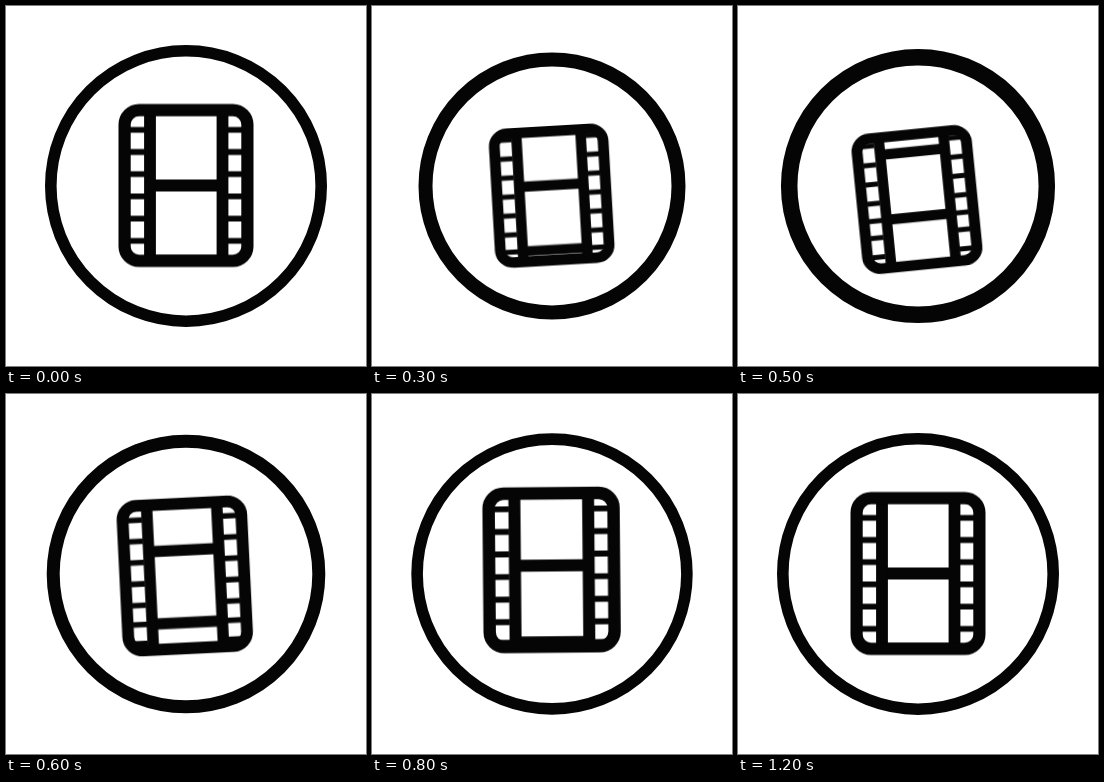
Recreate the animation shown at these times as an HTML page without scripts. Size 360 by 360 pixels, loop 1.4 s.

```html
<!DOCTYPE html>
<html lang="en">
<head>
<meta charset="utf-8">
<title>Film icon</title>
<style>
html, body { margin: 0; width: 100%; height: 100%; overflow: hidden; background: #fff; }
svg { display: block; width: 100vw; height: 100vh; }
.ring, .frame, .line, .holes { fill: none; stroke: #050505; }
.line { stroke-width: 11.8; }
.frame { stroke-width: 12.2; }
.holes { stroke-width: 16; stroke-dasharray: 5.8 16.4; }
.seam { stroke-width: 5.8; }
.ring, .film, .strip { animation: 1400ms step-end infinite; }
.ring { animation-name: ring; }
.film { animation-name: film; }
.strip { animation-name: strip; }

@keyframes ring {
  0%, 85.71%, 100% { r: 135.2px; stroke-width: 11.6px; }
  14.28% { r: 131.7px; stroke-width: 12.6px; }
  21.42% { r: 126.5px; stroke-width: 14px; }
  28.57% { r: 126.3px; stroke-width: 15.9px; }
  35.71% { r: 128.8px; stroke-width: 16.5px; }
  42.85% { r: 132.8px; stroke-width: 13px; }
  50% { r: 134.4px; stroke-width: 12px; }
  57.14% { r: 134.9px; stroke-width: 11.6px; }
  64.28% { r: 135.1px; stroke-width: 11.6px; }
}
@keyframes film {
  0%, 85.71%, 100% { transform: translate(180px, 179.5px) rotate(0deg) scale(1); }
  14.28% { transform: translate(180px, 183px) rotate(-1.1deg) scale(.965, .955); }
  21.42% { transform: translate(179.7px, 189.7px) rotate(-3.3deg) scale(.887, .856); }
  28.57% { transform: translate(179.3px, 193.5px) rotate(-5.2deg) scale(.865, .835); }
  35.71% { transform: translate(179px, 193.5px) rotate(-5.7deg) scale(.895, .866); }
  42.85% { transform: translate(178.8px, 182px) rotate(-2.8deg) scale(.968, .96); }
  50% { transform: translate(179.3px, 177.2px) rotate(-1.2deg) scale(1.005); }
  57.14% { transform: translate(179.6px, 176px) rotate(-.5deg) scale(1.017); }
  64.28% { transform: translate(179.9px, 177.3px) rotate(-.2deg) scale(1.01); }
  71.42% { transform: translate(180px, 178.5px) rotate(0deg) scale(1.004); }
  78.57% { transform: translate(180px, 179.2px) rotate(0deg) scale(1.001); }
}
@keyframes strip {
  0%, 85.71%, 100% { transform: translateY(0); }
  14.28% { transform: translateY(-3px); }
  21.42% { transform: translateY(-12.3px); }
  28.57% { transform: translateY(-38px); }
  35.71% { transform: translateY(-55.5px); }
  42.85% { transform: translateY(-27px); }
  50% { transform: translateY(-11px); }
  57.14% { transform: translateY(-4.4px); }
  64.28% { transform: translateY(-1.8px); }
  71.42% { transform: translateY(-.6px); }
  78.57% { transform: translateY(-.2px); }
}
</style>
</head>
<body>
<svg viewBox="0 0 360 360">
  <defs>
    <clipPath id="window"><rect x="-62" y="-75.5" width="124" height="151" rx="14"/></clipPath>
    <g id="piece">
      <path class="line" d="M-36 0H36M-36 75.5H36"/>
      <path class="holes" d="M-49 -58.6V58.2M49 -58.6V58.2"/>
      <path class="line seam" d="M-57 75.5H57"/>
    </g>
  </defs>
  <circle class="ring" cx="180" cy="180" r="135.2"/>
  <g class="film">
    <g clip-path="url(#window)">
      <g class="strip">
        <use href="#piece"/>
        <use href="#piece" y="151"/>
      </g>
    </g>
    <path class="line" d="M-36 -75V75M36.5 -75V75"/>
    <rect class="frame" x="-61.4" y="-75.4" width="122.8" height="150.8" rx="14.5"/>
  </g>
</svg>
</body>
</html>
```
